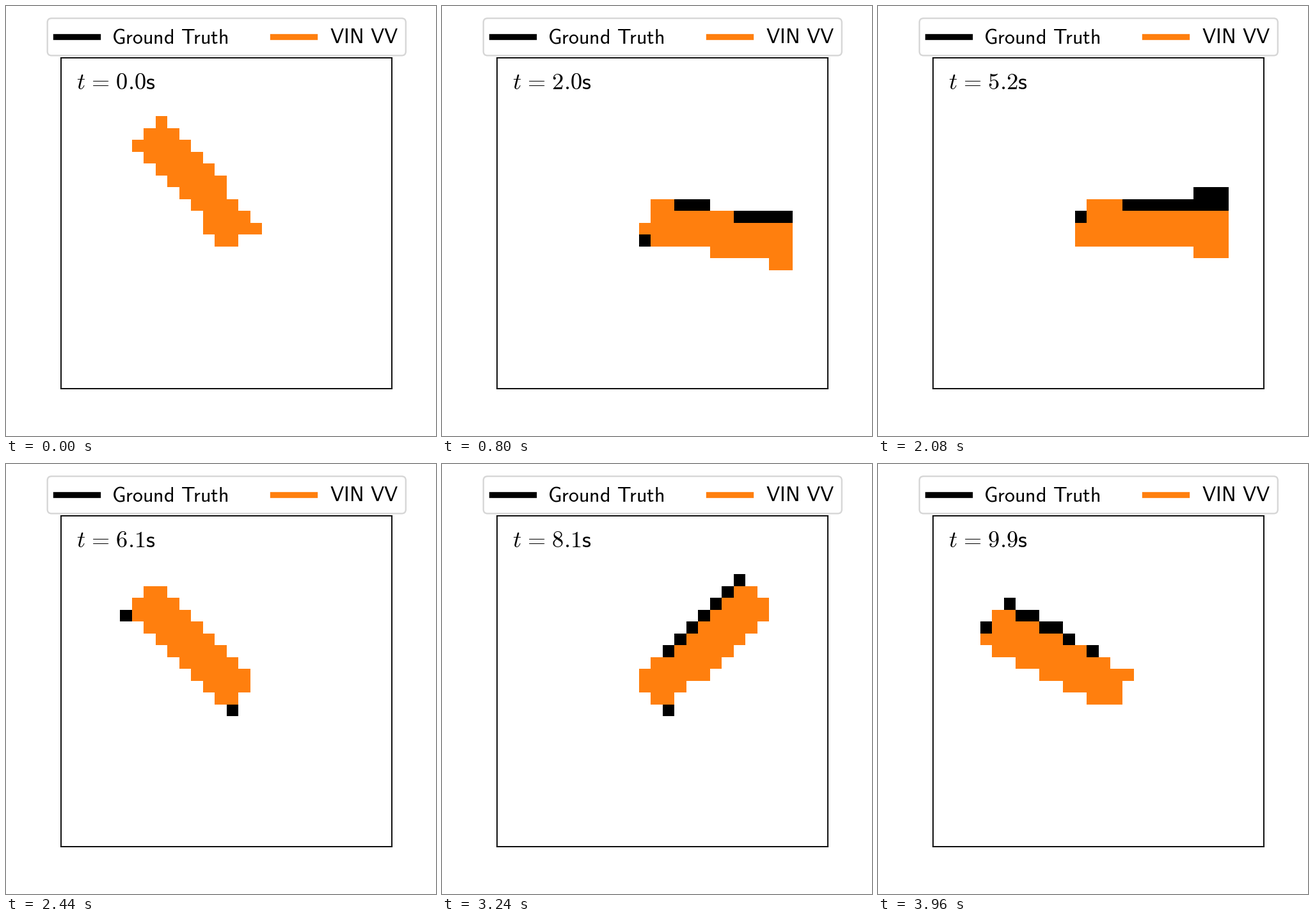
These frames come from a looping animation (672 px wide and 672 px high, 4000 ms). A matplotlib script:

```python
import numpy as np
import matplotlib.pyplot as plt
from matplotlib.animation import FuncAnimation
from matplotlib.patches import FancyBboxPatch

plt.rcParams["mathtext.fontset"] = "cm"

SIZE, DPI = 672, 168
FRAMES, INTERVAL = 100, 40
GRID = 28
BLACK, ORANGE = (0, 0, 0), (255, 127, 14)

# Rod outline in cells, seen from the pivot
PIVOT_X, PIVOT_Y = 13.84, 13.56
REACH, TAIL, HALF = 10.81, 1.81, 1.74


def swing(angle, speed, omega, substeps=100):
    """Pendulum angles every 0.1 s (velocity Verlet, zero is straight down)."""
    h = 0.1 / substeps
    acc = -omega**2 * np.sin(angle)
    out = []
    for _ in range(FRAMES):
        out.append(angle)
        for _ in range(substeps):
            speed += acc * h / 2
            angle += speed * h
            acc = -omega**2 * np.sin(angle)
            speed += acc * h / 2
    return np.array(out)


BIAS = np.radians(-2.1)
START = np.radians(-138.4)
truth = swing(START, 0.88, 3.145)
model = swing(START - BIAS, 0.96, 3.118) + BIAS

rows, cols = np.mgrid[:GRID, :GRID]
dx, dy = cols - PIVOT_X, rows - PIVOT_Y


def rod(angle):
    s, c = np.sin(angle), np.cos(angle)
    along = dx * s + dy * c
    across = dx * c - dy * s
    return (along > -TAIL) & (along < REACH) & (np.abs(across) < HALF)


def picture(i):
    img = np.full((GRID, GRID, 3), 255, np.uint8)
    img[rod(truth[i])] = BLACK
    img[rod(model[i])] = ORANGE
    return img


def clock(i):
    return rf"$t\hspace{{0.117}}=\hspace{{0.117}}{i / 10:.1f}\mathsf{{s}}$"


fig = plt.figure(figsize=(SIZE / DPI, SIZE / DPI), dpi=DPI, facecolor="white")
ax = fig.add_subplot()
image = ax.imshow(picture(0), interpolation="nearest")
ax.set_xticks([])
ax.set_yticks([])

# Transparent layer in pixel units for legend and clock
top = fig.add_axes([0, 0, 1, 1])
top.set_xlim(0, SIZE)
top.set_ylim(SIZE, 0)
top.axis("off")


def px(n):
    return n * 72 / DPI


def label(x, y, text, size):
    return top.text(x, y, text, fontsize=px(size), ha="left", va="baseline")


top.add_patch(FancyBboxPatch(
    (64.7, 19.2), 560.1, 58.2, boxstyle="round,pad=0,rounding_size=6.5",
    fc="white", ec="0.8", alpha=0.8, lw=1))

entries = [
    (77.7, "black", 165.3, r"$\mathsf{Ground\hspace{0.38}T\hspace{-0.095}ruth}$"),
    (416.6, "#ff7f0e", 506, r"$\mathsf{VIN\hspace{0.38}VV}$"),
]
for x, color, text_x, text in entries:
    top.plot([x, x + 65.3], [47.5, 47.5], color=color, lw=4,
             solid_capstyle="projecting")
    label(text_x, 58.5, text, 32)

time_text = label(110.5, 130.5, clock(0), 36.5)


def update(i):
    image.set_data(picture(i))
    time_text.set_text(clock(i))
    return image, time_text


anim = FuncAnimation(fig, update, frames=FRAMES, interval=INTERVAL,
                     repeat=True, repeat_delay=0)
plt.show()
```
